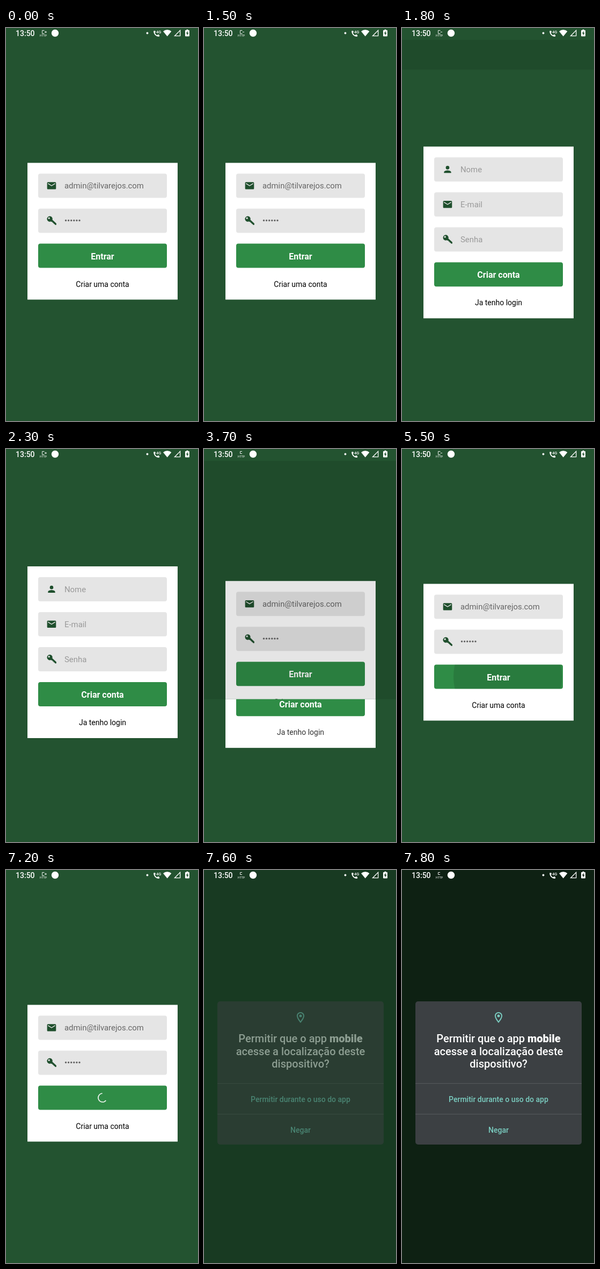
Write an HTML page that moves like this. It is 358 px wide and 730 px high and loops after 8 s.

```html
<!DOCTYPE html>
<html lang="pt-BR">
<head>
<meta charset="utf-8">
<title>Login</title>
<style>
  html, body { margin: 0; width: 100%; height: 100%; overflow: hidden; background: #235330; }
  svg { display: block; width: 358px; height: 730px; font-family: Roboto, "Noto Sans", sans-serif; }
  .mid { text-anchor: middle; }
  .bold { font-weight: 700; font-size: 16px; fill: #fff; }
  .link { font-size: 14px; fill: #000; }
  .value { font-size: 14.9px; fill: #666; }
  .hint { font-size: 14.9px; fill: #999; }
  .title { font-weight: 500; font-size: 20px; fill: #fff; }
  .action { font-weight: 500; font-size: 14px; fill: #7accc0; }
</style>
</head>
<body>
<svg viewBox="0 0 358 730">
  <defs>
    <path id="mail" d="M20 4H4c-1.1 0-2 .9-2 2v12c0 1.1.9 2 2 2h16c1.1 0 2-.9 2-2V6c0-1.1-.9-2-2-2zm0 4l-8 5-8-5V6l8 5 8-5v2z"/>
    <path id="person" d="M12 12a4 4 0 1 0 0-8 4 4 0 0 0 0 8zm0 2c-2.67 0-8 1.34-8 4v2h16v-2c0-2.66-5.33-4-8-4z"/>
    <g id="key">
      <path fill-rule="evenodd" d="M8 1.8a6.2 6.2 0 1 0 2.6 11.8l1.6 1.2 1.9-.1.2 2.1 2.1.1.2 2.2 2 .1 1.2 2.2h2.9v-3.2l-8.9-8.4A6.2 6.2 0 0 0 8 1.8zM6.2 4.3a2 2 0 1 1 0 4 2 2 0 0 1 0-4z"/>
    </g>
    <clipPath id="reveal"><rect id="revealBox" width="358" height="730"/></clipPath>
    <clipPath id="buttonClip"><rect x="60" y="400.5" width="240" height="45" rx="4"/></clipPath>
  </defs>

  <rect width="358" height="730" fill="#235330"/>
  <g id="login"></g>
  <rect id="shade" y="22" width="358" height="708"/>
  <g clip-path="url(#reveal)" id="register">
    <rect width="358" height="730" fill="#235330"/>
    <g id="registerCard"></g>
  </g>

  <rect id="dim" width="358" height="730"/>
  <g id="dialog">
    <rect x="25" y="244" width="310" height="266" rx="5" fill="#3c4043"/>
    <path d="M25 396.5h310M25 453.5h310" stroke="#565a5d"/>
    <g transform="translate(168 262)" fill="#7accc0">
      <path fill-rule="evenodd" d="M12 2C8.13 2 5 5.13 5 9c0 5.25 7 13 7 13s7-7.75 7-13c0-3.87-3.13-7-7-7zM7 9c0-2.76 2.24-5 5-5s5 2.24 5 5c0 2.88-2.88 7.19-5 9.88C9.92 16.21 7 11.85 7 9z"/>
      <circle cx="12" cy="9" r="2.5"/>
    </g>
    <g class="title mid">
      <text x="180" y="320">Permitir que o app <tspan font-weight="900">mobile</tspan></text>
      <text x="180" y="343.5">acesse a localização deste</text>
      <text x="180" y="366.5">dispositivo?</text>
    </g>
    <g class="action mid">
      <text x="180" y="430.5">Permitir durante o uso do app</text>
      <text x="180" y="487.5">Negar</text>
    </g>
  </g>

  <g id="status" fill="#fff">
    <text x="18" y="14.5" font-size="14" font-weight="500">13:50</text>
    <path id="proxy" fill="none" stroke="#fff" stroke-width=".9"/>
    <text x="63" y="15.5" font-size="5.2">HTTP</text>
    <circle cx="91.5" cy="9.5" r="6.7"/>
    <circle cx="263.5" cy="9.5" r="1.9"/>
    <path d="M276 5.2h2.2l.7 2.6-1.4 1.5a9.5 9.5 0 0 0 4.2 4.2l1.5-1.5 2.8.8v2.5c0 .5-.4.8-.8.8C279.500 16 275.200 11.300 275.200 6c0-.5.300-.8.800-.8z"/>
    <text x="280" y="9.500" font-size="7.500" font-weight="500">4G</text>
    <path d="M293 6.300a11.500 11.500 0 0 1 15.400 0L300.700 15.500z"/>
    <path d="M314.500 14.700H324.700V4.300z" fill="none" stroke="#fff" stroke-width="1.300"/>
    <path fill-rule="evenodd" d="M336.500 4V2.800h3V4h1.500q1 0 1 1v9.500q0 1-1 1h-6q-1 0-1-1V5q0-1 1-1zM338.700 5.500l-3 4.800h1.800v3.700l3-5h-1.800z"/>
  </g>
</svg>
<script>
const LOOP = 8000, STEP = 100;
const TOP = 22, HEIGHT = 708;
const $ = id => document.getElementById(id);
const clamp = v => Math.min(1, Math.max(0, v));

const panel = (y, h) => `<rect x="40" y="${y}" width="280" height="${h}" fill="#fff"/>`;
const box = (y, color) => `<rect x="60" y="${y}" width="240" height="45" rx="4" fill="${color}"/>`;
const label = (cls, y, text, id = '') => `<text id="${id}" class="${cls} mid" x="180" y="${y}">${text}</text>`;
const field = (y, icon, cls, text) => box(y, '#e5e5e5') +
  `<use href="#${icon}" fill="#1f4f2d" transform="translate(75 ${y + 12.5}) scale(.83)"/>` +
  `<text class="${cls}" x="109" y="${y + 27.5}">${text}</text>`;
const dots = Array.from({length: 6}, (_, i) =>
  `<circle cx="${111.5 + 5.1 * i}" cy="357.500" r="1.650" fill="#666"/>`).join('');

$('login').innerHTML = panel(250.5, 254) +
  field(270.5, 'mail', 'value', 'admin@tilvarejos.com') +
  field(335.5, 'key', 'value', '') + dots +
  box(400.5, '#2f8c46') +
  '<g clip-path="url(#buttonClip)"><circle id="ripple" cx="197" cy="423"/></g>' +
  label('bold', 429.7, 'Entrar', 'enter') +
  '<path id="spinner" fill="none" stroke="#f0f5f1" stroke-width="1.700"/>' +
  label('link', 480.7, 'Criar uma conta');

$('registerCard').innerHTML = panel(218, 319) +
  field(238, 'person', 'hint', 'Nome') +
  field(303, 'mail', 'hint', 'E-mail') +
  field(368, 'key', 'hint', 'Senha') +
  box(433, '#2f8c46') +
  label('bold', 462.2, 'Criar conta') +
  label('link', 513.2, 'Ja tenho login', 'back');

function bezier(x1, y1, x2, y2) {
  const at = (s, a, b) => 3 * s * (1 - s) ** 2 * a + 3 * s * s * (1 - s) * b + s ** 3;
  return x => {
    let lo = 0, hi = 1;
    for (let i = 0; i < 24; i++) {
      const s = (lo + hi) / 2;
      if (at(s, x1, x2) < x) lo = s; else hi = s;
    }
    return at(lo, y1, y2);
  };
}
const revealEase = bezier(.20833, .82, .25, 1);
const trimEase = bezier(.4, 0, .2, 1);
const ramp = (t, start, length, ease) => ease(clamp((t - start) / length));

// The register screen is uncovered from the bottom while the login screen drifts up.
function drawScreens(t) {
  const p = ramp(t, 1608, 425, revealEase) - ramp(t, 3621, 425, revealEase);
  const gap = HEIGHT * (1 - p);
  $('register').style.display = p > .001 ? '' : 'none';
  $('revealBox').setAttribute('y', TOP + gap);
  $('registerCard').setAttribute('transform', `translate(0 ${.041 * gap})`);
  $('login').setAttribute('transform', `translate(0 ${-.02 * HEIGHT * p})`);
  $('login').style.display = t < 7600 ? '' : 'none';
  $('shade').setAttribute('opacity', .1 * clamp(p / .36));
  $('back').setAttribute('opacity', t >= 3700 ? .8 : 1);
}

function drawButton(t) {
  const fade = clamp((t - 5600) / 400);
  $('ripple').setAttribute('r', 101 + 60 * fade);
  $('ripple').setAttribute('opacity', t >= 5500 ? .12 * (1 - fade) : 0);

  const loading = t >= 6100;
  $('enter').style.display = loading ? 'none' : '';
  $('spinner').style.display = loading ? '' : 'none';
  if (!loading) return;
  // The spinner stalls while the next screen is prepared.
  const clock = t >= 7200 ? 820 : Math.min(t, 6900) - 6100;
  const phase = clock / 1333;
  const turn = phase * .25 + clock / 2222 - .56;
  const from = turn + .75 * trimEase(clamp(phase * 2 - 1));
  const to = turn + .75 * trimEase(clamp(phase * 2)) + .03;
  const point = a => `${180 + 8 * Math.cos(a * 2 * Math.PI)} ${423 + 8 * Math.sin(a * 2 * Math.PI)}`;
  $('spinner').setAttribute('d', `M${point(from)}A8 8 0 ${to - from > .5 ? 1 : 0} 1 ${point(to)}`);
}

function drawDialog(t) {
  const shown = t >= 7800 ? 1 : t >= 7600 ? .5 : 0;
  $('dim').setAttribute('opacity', .6 * shown);
  $('dialog').setAttribute('opacity', shown);
}

const proxyShapes = [
  'M71 4.500H67.500V8.500H71',
  'M71 4.500H67.500V10.500H71',
  'M71 5.500V4.500H67.500V10.500H71V9.500M72 7.500H75',
  'M71 5.500V4.500H67.500V10.500H71V9.500M72 7.500H76M74 5.500V9.500'
];
function drawProxy(t) {
  const local = (t + 3500) % 3600;
  const index = local < 700 ? 0 : local < 1400 ? 1 : local < 2200 ? 2 : 3;
  $('proxy').setAttribute('d', proxyShapes[index]);
}

function draw(time) {
  const t = Math.floor(time % LOOP / STEP) * STEP;
  drawScreens(t);
  drawButton(t);
  drawDialog(t);
  drawProxy(t);
}

const start = performance.now();
function tick() {
  draw(performance.now() - start);
  requestAnimationFrame(tick);
}
tick();
</script>
</body>
</html>
```
